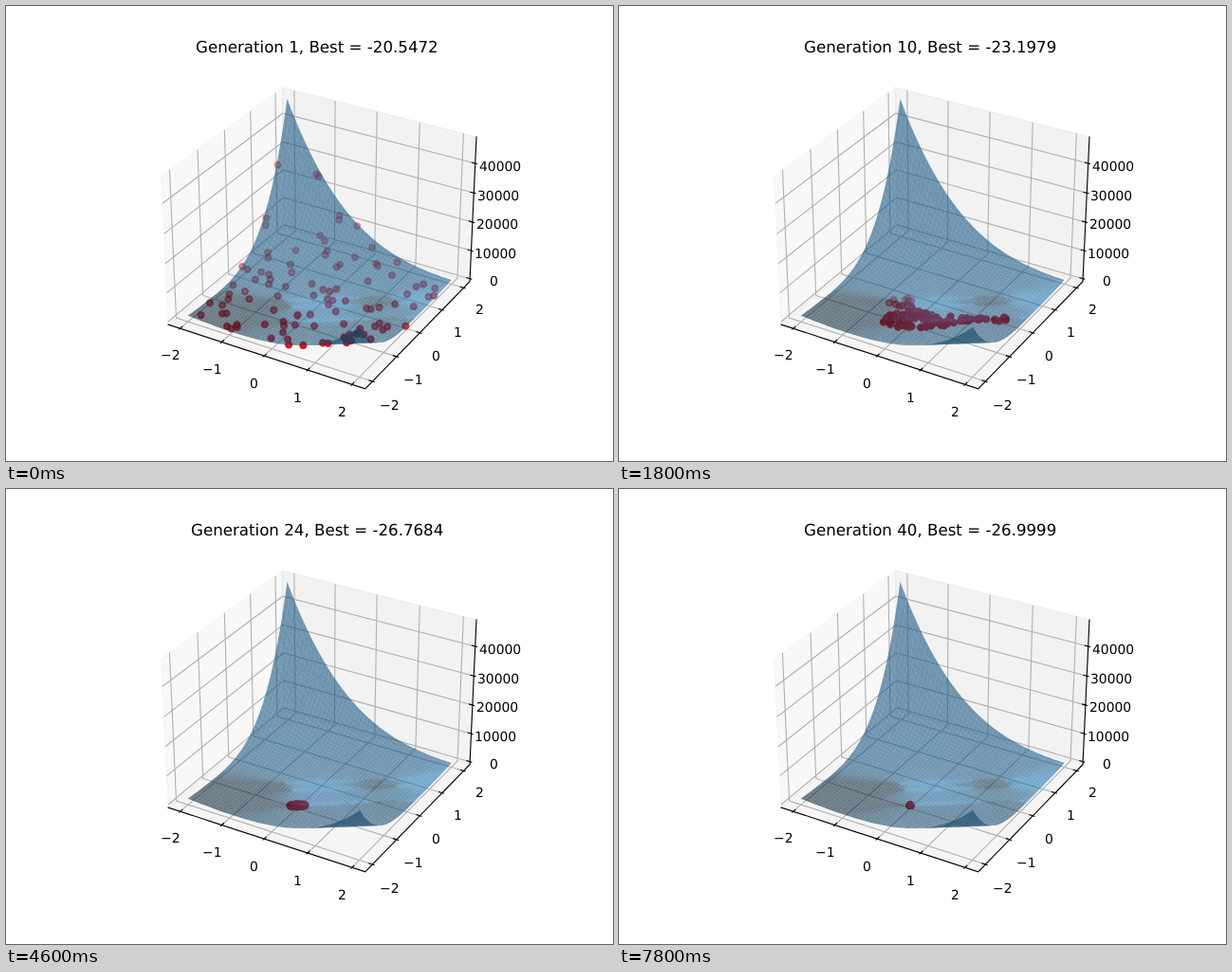
An HTML page that plays this animation: 640x480 px, repeating every 8 s.

```html
<!DOCTYPE html>
<html lang="en">
<head>
<meta charset="utf-8">
<style>
  html, body { margin: 0; width: 100%; height: 100%; overflow: hidden; background: #fff; }
  svg { display: block; width: 640px; height: 480px; }
  text { font-family: "DejaVu Sans", sans-serif; font-size: 13.889px; text-rendering: geometricPrecision; }
  #title { font-size: 16.667px; }
</style>
</head>
<body>
<svg id="stage" viewBox="0 0 640 480"></svg>
<script>
const stage = document.getElementById('stage');
const TICKS = [-2, -1, 0, 1, 2];
const STEP = 200, GENERATIONS = 40, COUNT = 100;

function add(parent, tag, attrs) {
  const el = document.createElementNS('http://www.w3.org/2000/svg', tag);
  for (const key in attrs) el.setAttribute(key, attrs[key]);
  return parent.appendChild(el);
}

// Centres text on x, with its corner on whole pixels
function setText(el, text, x, y) {
  el.textContent = text;
  el.setAttribute('x', Math.round(x - el.getComputedTextLength() / 2));
  el.setAttribute('y', Math.round(y));
}

function rng(seed) {
  let s = (seed * 7919 + 12345) >>> 0;
  return () => {
    s = (s + 0x6D2B79F5) >>> 0;
    let t = Math.imul(s ^ (s >>> 15), 1 | s);
    t = (t + Math.imul(t ^ (t >>> 7), 61 | t)) ^ t;
    return ((t ^ (t >>> 14)) >>> 0) / 4294967296;
  };
}

const mix = (a, b, k) => a + (b - a) * k;

// Objective function, lowest at (0, -1)
function f(x, y) {
  const a = (x + y + 1) ** 2 * (19 - 14 * x + 3 * x * x - 14 * y + 6 * x * y + 3 * y * y);
  const b = (2 * x - 3 * y) ** 2 * (18 - 32 * x + 12 * x * x + 48 * y - 36 * x * y + 27 * y * y);
  return a + b;
}

// Perspective camera: elevation 30, azimuth -60, distance 10
const Z0 = f(0, -1), Z1 = f(-2, 2), RANGE = Z1 - Z0;
function project(x, y, z) {
  const dx = x * 8 / 7 / 4.4, dy = y * 8 / 7 / 4.4;
  const dz = ((z - Z0) / RANGE - 0.5) * 6 / 7;
  const w = 10 - (0.4330127 * dx - 0.75 * dy + 0.5 * dz);
  const right = (0.8660254 * dx + 0.5 * dy) / w;
  const up = (-0.25 * dx + 0.4330127 * dy + 0.8660254 * dz) / w;
  const scale = 369.6 / 0.185;
  return [143.2 + (right + 0.095) * scale, 427.2 - (up + 0.095) * scale, w];
}
const pts = list => list.map(p => project(...p).slice(0, 2).map(v => v.toFixed(2)).join()).join(' ');

// Box
const E = 2.2 * 25 / 24, LO = Z0 - RANGE / 48, HI = Z1 + RANGE / 48;

function pane(corners, color) {
  add(stage, 'polygon', {
    points: pts(corners), fill: color, stroke: color,
    'fill-opacity': 0.5, 'stroke-opacity': 0.5, 'stroke-width': 1.39
  });
}
function line(list, color, cap) {
  add(stage, 'polyline', {
    points: pts(list), fill: 'none', stroke: color, 'stroke-width': 1.11, 'stroke-linecap': cap
  });
}
const gridLine = list => line(list, '#b0b0b0', 'butt');
const axisLine = list => line(list, '#000', 'square');

function label(pos, value) {
  const [x, y] = project(...pos);
  setText(add(stage, 'text', {}), String(value).replace('-', '\u2212'), x, y + 11);
}

function drawBox() {
  pane([[-E, -E, LO], [-E, E, LO], [-E, E, HI], [-E, -E, HI]], '#f2f2f2');
  pane([[-E, E, LO], [E, E, LO], [E, E, HI], [-E, E, HI]], '#e6e6e6');
  pane([[-E, -E, LO], [E, -E, LO], [E, E, LO], [-E, E, LO]], '#ececec');

  const heights = TICKS.map(t => (t + 2) * 10000);
  for (const t of TICKS) {
    gridLine([[t, -E, LO], [t, E, LO], [t, E, HI]]);
    gridLine([[E, t, LO], [-E, t, LO], [-E, t, HI]]);
  }
  for (const z of heights) gridLine([[-E, -E, z], [-E, E, z], [E, E, z]]);

  axisLine([[-E, -E, LO], [E, -E, LO], [E, E, LO], [E, E, HI]]);
  const out = E + 0.037, inn = E - 0.073, far = E + 0.38, low = LO - 0.0865 * RANGE;
  for (const t of TICKS) {
    axisLine([[t, -out, LO], [t, -inn, LO]]);
    axisLine([[out, t, LO], [inn, t, LO]]);
    label([t, -far, low], t);
    label([far, t, low], t);
  }
  for (const z of heights) {
    axisLine([[out, E, z], [inn, E, z]]);
    label([far, far, z], z);
  }
}

// Translucent surface, lit by the direction of its normals
function drawSurface(n) {
  const h = 4 / n;
  const at = (i, j) => {
    const x = -2 + h * i, y = -2 + h * j;
    return [x, y, f(x, y)];
  };
  const cells = [];
  for (let j = 0; j < n; j++) {
    for (let i = 0; i < n; i++) {
      const quad = [at(i, j), at(i + 1, j), at(i + 1, j + 1), at(i, j + 1)];
      const nx = (quad[0][2] - quad[1][2]) / h, ny = (quad[1][2] - quad[2][2]) / h;
      const dot = (1 - 2 * nx - 2 * ny) / 3 / Math.hypot(nx, ny, 1);
      const shade = 0.65 + 0.35 * dot;
      const depth = quad.reduce((sum, p) => sum + project(...p)[2], 0);
      cells.push({ quad, shade, depth });
    }
  }
  cells.sort((a, b) => b.depth - a.depth);
  const group = add(stage, 'g', { 'fill-opacity': 0.6 });
  for (const { quad, shade } of cells) {
    const rgb = [31, 119, 180].map(c => Math.round(c * shade));
    add(group, 'polygon', { points: pts(quad), fill: `rgb(${rgb})` });
  }
}

// Best value at key generations
const BEST = [[1, -20.5472], [7, -22.5743], [14, -24.0293], [20, -26.7496],
  [24, -26.7684], [30, -26.9996], [40, -26.9999]];
function bestAt(gen) {
  const i = Math.max(1, BEST.findIndex(k => k[0] >= gen));
  const [g0, b0] = BEST[i - 1], [g1, b1] = BEST[i];
  return mix(b0, b1, (gen - g0) / (g1 - g0));
}

// How far above the minimum a survivor may lie
function tolerance(gen) {
  const d = gen - 7;
  return Math.exp(d < 0 ? mix(3.95, 10.8, -d / 6) : 3.95 - 0.13 * d - 0.0042 * d * d);
}

function population(gen) {
  const r = rng(gen), limit = tolerance(gen);
  const reach = gen < 7 ? 4 : 0.3 * Math.sqrt(limit);
  const pick = centre => mix(Math.max(-2, centre - reach), Math.min(2, centre + reach), r());
  const list = [];
  while (list.length < COUNT) {
    const x = pick(0), y = pick(-1), z = f(x, y);
    if (z - Z0 <= limit) list.push(project(x, y, z));
  }
  return list.sort((a, b) => b[2] - a[2]);
}

drawBox();
const dotLayer = add(stage, 'g', { fill: '#d4000a', stroke: '#d4000a', 'stroke-width': 2.08 });
const dots = Array.from({ length: COUNT }, () => add(dotLayer, 'circle', { r: 3.1 }));
drawSurface(50);
const title = add(stage, 'text', { id: 'title' });

function show(gen) {
  setText(title, `Generation ${gen}, Best = ${bestAt(gen).toFixed(4)}`, 328, 49);
  const list = population(gen);
  const far = list[0][2], near = list[COUNT - 1][2];
  list.forEach(([x, y, w], i) => {
    const alpha = 1 - 0.7 * (w - near) / (far - near);
    const attrs = { cx: x, cy: y, 'fill-opacity': alpha, 'stroke-opacity': alpha };
    for (const key in attrs) dots[i].setAttribute(key, attrs[key].toFixed(3));
  });
}

let current = 0;
const begin = performance.now();
function tick() {
  const gen = 1 + Math.floor((performance.now() - begin) / STEP) % GENERATIONS;
  if (gen !== current) show(current = gen);
  requestAnimationFrame(tick);
}
tick();
</script>
</body>
</html>
```
